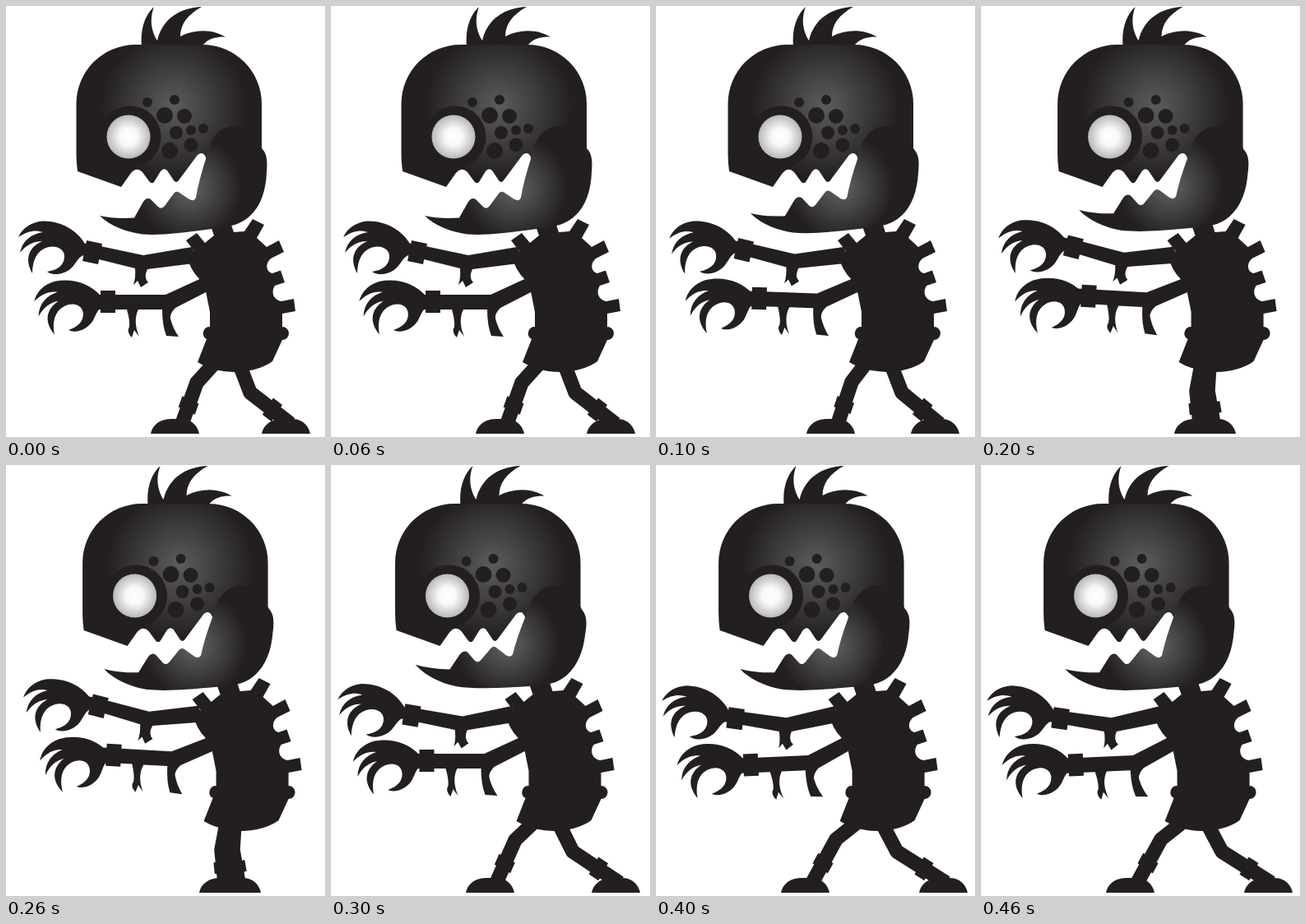
These frames come from a looping animation (388x524 px, 500 ms). An HTML page:

```html
<!DOCTYPE html>
<html lang="en">
<head>
<meta charset="utf-8">
<title>Walking zombie</title>
<style>
  html, body { margin: 0; width: 100%; height: 100%; overflow: hidden; background: #fff; }
  svg { display: block; width: 388px; height: 524px; }
  .bone { fill: none; stroke: #231f20; stroke-width: 17.5px; stroke-linejoin: round; }
</style>
</head>
<body>
<svg viewBox="0 0 388 524" fill="#231f20">
  <defs>
    <radialGradient id="skull" gradientUnits="userSpaceOnUse" cx="204" cy="122" r="89">
      <stop offset="0" stop-color="#5c5c5e"/><stop offset="1" stop-color="#231f20"/>
    </radialGradient>
    <radialGradient id="chin" gradientUnits="userSpaceOnUse" cx="223" cy="221" r="64">
      <stop offset="0" stop-color="#636365"/><stop offset="1" stop-color="#231f20"/>
    </radialGradient>
    <radialGradient id="ball">
      <stop offset="0" stop-color="#fff"/><stop offset=".4" stop-color="#f8f8f8"/><stop offset="1" stop-color="#b8b8b9"/>
    </radialGradient>
    <path id="hand" d="M96 289C86 272 66 261 44 261.500C30 263 20 270 15 281C27 273 36 272 45 275C31 277 20 285 17 300C25 290 34 286 44 286C28 293 22 307 32 325C32 309 38 297 50 293.500C62 290 72 296 71 306C70 316 62 321 50 323C58 329 73 326 81 317C87 310 88 305 96 302Z"/>
    <path id="foot" d="M0 520C2 509 12 502 25 502H37C49 502 57 510 59 520Z"/>
  </defs>

  <g id="legL"><path class="bone"/><path class="cuff" d="M-11-8L11-6V8L-11 6Z"/><use class="sole" href="#foot"/></g>
  <g id="legR"><path class="bone"/><path class="cuff" d="M-12-6L12-8V6L-12 8Z"/><use class="sole" href="#foot"/></g>

  <g id="body">
    <path d="M247 262L272 260L277 275L290 274L300 259L314 266L305 282L317 293L332 285L338 299L322 307C315 313 316 323 324 325L334 321.500L339 336L327 340C322 348 325 357 335 359L350 356L352 371L336 374L336 390A8 8 0 0 1 336 406L324 432C302 448 262 450 233 433L244 405A8 8 0 0 1 248 390L248 372L241 337Q228 327 222 311L229 298L219 285L232 276L242 288L253 279Z"/>

    <g id="armA">
      <path d="M110 291L167 303L226 293L236 312L172 320Q167 330 173 336L164 342L160 334L155 339Q158 330 157 319L85 301V287Z"/>
      <path d="M98 285L117 289L112 314L93 310Z"/>
      <use id="handA" href="#hand"/>
    </g>

    <g id="armB">
      <path d="M110 351H194L242 329L247 346L206 367Q199 374 200 380Q203 392 210 402L195 401Q190 388 190 369H161Q154 383 162 402L156 394L153 403Q146 396 150 390Q151 383 147 369H105Z"/>
      <path d="M115 346H133V373H115Z"/>
      <use id="handB" href="#hand"/>
    </g>

    <path d="M165 50C163 28 169 11 180 1C174 17 177 31 184 42C190 16 211 2 238 1C220 11 212 23 212 37C229 28 251 28 267 37.500C250 37 242 43 238 50Z"/>
    <path fill="url(#skull)" d="M87 201Q85.500 190 85.500 180V119A72 72 0 0 1 157.500 47H239A72 72 0 0 1 311 119V200L295 225H242L244 187Q241 175 233 181L210 212Q207 216 204 212L196 200Q192 196 188 201L180 214Q177 217 174 213L166 202Q159 195 152 203L140 220Z"/>
    <circle cx="151" cy="159" r="37.500"/>
    <circle cx="149" cy="159" r="26.500" fill="url(#ball)"/>
    <g id="spots"></g>
    <path id="jaw" fill="url(#chin)" d="M114 255Q132 259 156 257.500L167 238Q171 232 176 235L185 244Q189 248 193 243L204 228Q207 224 211 227L223 235Q229 238 231 233Q234 214 243 186C246 164 257 148 275 146C292 146 304 160 311 173C318 180 318 190 317 202C316 234 303 262 270 268L250 271C214 276 187 279 166 277.500C146 275 126 267 114 255Z"/>
  </g>
</svg>
<script>
const $ = id => document.getElementById(id);
const STEP = 100;

// Angles are in radians; legs hold hip x, knee x, knee y, ankle x and toe x.
const poses = [
  { x: 0,    jaw: 0,    armA: 0,    handA: 0,    armB: 0,    handB: 0,    L: [252, 232, 458, 214, 176], R: [284, 297, 470, 346, 311] },
  { x: 2,    jaw: .019, armA: .022, handA: -.05, armB: .034, handB: -.04, L: [254, 238, 457, 221, 183], R: [286, 299, 470, 345, 310] },
  { x: 7.6,  jaw: .045, armA: .05,  handA: -.09, armB: .058, handB: -.08, L: [268, 262, 468, 266, 235], R: [278, 276, 468, 283, 251] },
  { x: -7.5, jaw: .077, armA: -.04, handA: .01,  armB: 0,    handB: -.02, L: [245, 224, 456, 201, 164], R: [277, 294, 470, 351, 317] },
  { x: -9.4, jaw: .045, armA: -.07, handA: .035, armB: -.045, handB: -.01, L: [243, 219, 455, 190, 152], R: [275, 293, 470, 353, 320] }
];

const spots = [[172, 117, 6], [205, 114, 6], [193, 133, 10], [217, 134, 9], [207, 154, 8],
  [225, 151, 6], [240, 149, 6], [225, 169, 8.5], [199, 176, 10]];
$('spots').innerHTML = spots.map(([x, y, r]) => `<circle cx="${x}" cy="${y}" r="${r}"/>`).join('');

const move = (el, value) => el.setAttribute('transform', value);
const turn = (angle, x, y) => `rotate(${angle * 180 / Math.PI} ${x} ${y})`;

function setLeg(leg, [hip, kneeX, kneeY, ankle, toe]) {
  const angle = Math.atan2(508 - kneeY, ankle - kneeX) - Math.PI / 2;
  const x = kneeX + (ankle - kneeX) * .55, y = kneeY + (508 - kneeY) * .55;
  leg.querySelector('.bone').setAttribute('d', `M${hip} 436L${kneeX} ${kneeY}L${ankle} 508`);
  move(leg.querySelector('.cuff'), `translate(${x} ${y}) ${turn(angle, 0, 0)}`);
  move(leg.querySelector('.sole'), `translate(${toe} 0)`);
}

function show(p) {
  move($('body'), `translate(${p.x} 0)`);
  move($('jaw'), turn(p.jaw, 270, 200));
  move($('armA'), turn(p.armA, 230, 290));
  move($('armB'), turn(p.armB, 240, 345));
  move($('handA'), turn(p.handA - p.armA, 103, 299));
  move($('handB'), `translate(21 62) ${turn(p.handB - p.armB - .18, 103, 299)}`);
  setLeg($('legL'), p.L);
  setLeg($('legR'), p.R);
}

const start = performance.now();
function tick(now) {
  const t = Math.max(0, now - start);
  show(poses[Math.floor(t / STEP) % poses.length]);
  requestAnimationFrame(tick);
}
show(poses[0]);
requestAnimationFrame(tick);
</script>
</body>
</html>
```
